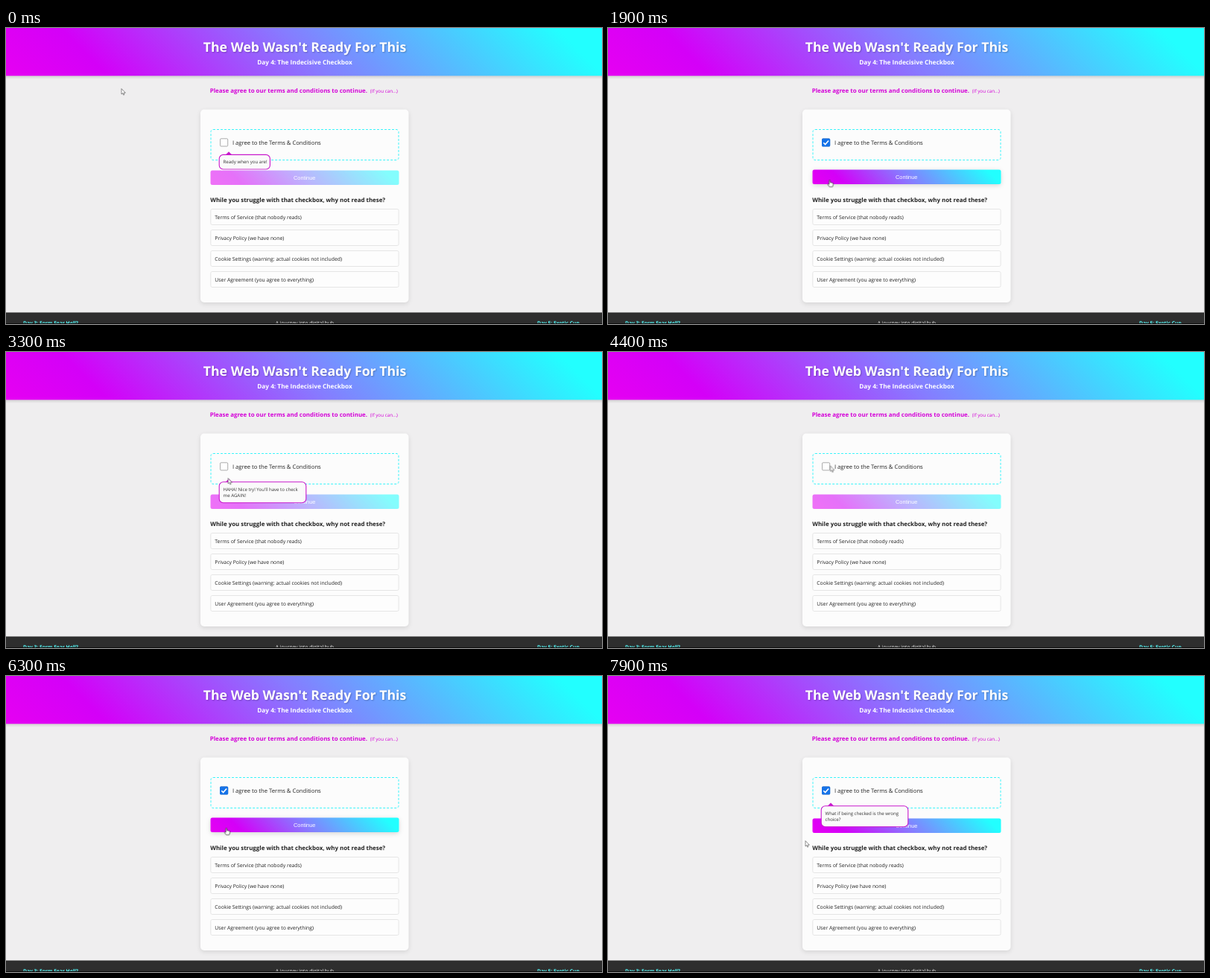
An HTML page that plays this animation: 800 by 398 pixels, repeating every 8000 ms.

```html
<!DOCTYPE html>
<html lang="en">
<head>
<meta charset="utf-8">
<title>The Indecisive Checkbox</title>
<style>
  html, body { margin: 0; width: 100%; height: 100%; overflow: hidden; background: #efeeef; }
  svg { display: block; width: 100vw; height: 100vh; }
  text { font-family: "Open Sans", "Noto Sans", sans-serif; fill: #222; text-rendering: geometricPrecision; }
  .bold { font-weight: 700; }
  .mid { text-anchor: middle; }
  .title { font-size: 17.7px; fill: #fff; text-shadow: 1px 1px 2px rgba(0, 0, 0, .25); }
  .sub { font-size: 8.26px; fill: #fff; }
  .lead { font-size: 7.92px; fill: #d400d8; }
  .aside { font-size: 6.3px; fill: #d400d8; }
  .agree { font-size: 7.65px; }
  .heading { font-size: 7.9px; }
  .links text { font-size: 6.85px; }
  .links rect { fill: #fdfdfd; stroke: #e2e2e2; stroke-width: .9; }
  .button text { font: 7.3px "Liberation Sans", Arial, sans-serif; fill: #fff; }
  .foot text { font-size: 6.7px; }
  .foot .cyan { fill: #5ff; }
  .foot .white { fill: #fff; }
  .bubble text { font-size: 6.1px; fill: #333; }
  .bubble rect { fill: #fafafa; stroke: #c818cc; stroke-width: 1.1; }
  .bubble path { fill: #c818cc; }

  /* everything shares one 8 s clock; states switch hard, moves are eased */
  .state { animation: 8s step-end infinite; }
  .move { animation: 8s ease-in-out infinite; }

  .checked { animation-name: checked; }
  @keyframes checked { 0%, 27.5% { opacity: 0; } 17.5%, 58.5% { opacity: 1; } }

  .face { animation-name: face; }
  @keyframes face { 0%, 27.5% { opacity: .55; } 17.5%, 58.5% { opacity: 1; } }

  .lift { animation-name: lift; }
  @keyframes lift {
    0%, 27.5%, 79% { transform: none; }
    23.5%, 63.5% { transform: translateY(-1px); }
  }

  .glow { animation-name: glow; }
  @keyframes glow { 0%, 36%, 79% { opacity: 0; } 23.5%, 63.5% { opacity: 1; } }

  .ready { animation-name: ready; }
  @keyframes ready { 0% { opacity: 1; } 17.5% { opacity: 0; } }
  .haha { animation-name: haha; }
  @keyframes haha { 0%, 50% { opacity: 0; } 27.5% { opacity: 1; } }
  .doubt { animation-name: doubt; }
  @keyframes doubt { 0% { opacity: 0; } 83.5% { opacity: 1; } }

  .hop { animation-name: hop; }
  @keyframes hop { 0%, 1.25% { transform: translateY(-4.3px); } 5%, 100% { transform: none; } }
  .shake { animation-name: shake; }
  @keyframes shake {
    0%, 83.5%, 91%, 100% { transform: none; }
    85.5%, 89.3% { transform: translateX(2px); }
    87.5%, 88% { transform: translateX(-2px); }
  }

  .cursor { animation-name: travel; }
  @keyframes travel {
    0%, 1.25% { transform: translate(155px, 82px); }
    12.5%, 18.5% { transform: translate(289px, 153px); }
    24%, 34% { transform: translate(297.5px, 204.5px); }
    46%, 55.5% { transform: translate(298.5px, 153.5px); }
    57.5%, 59% { transform: translate(294px, 154px); }
    65%, 78% { transform: translate(298px, 203.5px); }
    84.5% { transform: translate(214px, 235px); animation-timing-function: linear; }
    87.5% { transform: translate(224px, 231px); animation-timing-function: linear; }
    90% { transform: translate(239.5px, 229px); }
    98%, 100% { transform: translate(265px, 222px); }
  }

  .arrow { animation-name: arrow; }
  @keyframes arrow {
    0%, 20%, 36%, 59.5%, 79% { opacity: 1; }
    12%, 23.5%, 56.5%, 63.5% { opacity: 0; }
  }
  .hand { animation-name: hand; }
  @keyframes hand {
    0%, 20%, 27.5%, 59.5%, 79% { opacity: 0; }
    12%, 23.5%, 56.5%, 63.5% { opacity: 1; }
  }
  .denied { animation-name: denied; }
  @keyframes denied { 0%, 36% { opacity: 0; } 27.5% { opacity: 1; } }
</style>
</head>
<body>
<svg viewBox="0 0 800 398" preserveAspectRatio="none">
  <defs>
    <linearGradient id="neon">
      <stop stop-color="#e600f2"/>
      <stop offset=".16" stop-color="#d400f8"/>
      <stop offset=".5" stop-color="#867cff"/>
      <stop offset=".93" stop-color="#22ffff"/>
    </linearGradient>
    <linearGradient id="banner" href="#neon" gradientUnits="userSpaceOnUse" x1="183.75" y1="248.75" x2="616.25" y2="-183.75"/>
    <linearGradient id="action" href="#neon" gradientUnits="userSpaceOnUse" x1="332.9" y1="269.4" x2="469.1" y2="133.1"/>
    <linearGradient id="fade" x2="0" y2="1">
      <stop stop-color="#000" stop-opacity=".13"/>
      <stop offset="1" stop-color="#000" stop-opacity="0"/>
    </linearGradient>
    <filter id="blur" x="-20%" y="-50%" width="140%" height="200%"><feGaussianBlur stdDeviation="3"/></filter>
  </defs>

  <rect width="800" height="398" fill="#efeeef"/>
  <rect y="64" width="800" height="5" fill="url(#fade)"/>
  <rect width="800" height="64.3" fill="url(#banner)"/>
  <text class="title bold mid" x="401" y="31.5">The Web Wasn't Ready For This</text>
  <text class="sub bold mid" x="401" y="48.5">Day 4: The Indecisive Checkbox</text>

  <text class="lead bold" x="273.7" y="87">Please agree to our terms and conditions to continue.</text>
  <text class="aside" x="488.8" y="87">(If you can...)</text>

  <rect x="261" y="111.5" width="279.5" height="259.5" rx="5" opacity=".11" filter="url(#blur)"/>
  <rect x="261" y="109.5" width="279.5" height="259.5" rx="5" fill="#fcfcfc"/>
  <rect x="275" y="136.5" width="252" height="41" rx="3" fill="none" stroke="#3cf4fa" stroke-width="1" stroke-dasharray="3 2"/>

  <rect x="287.5" y="148.8" width="10.2" height="10.2" rx="1.2" fill="#fff" stroke="#888" stroke-width=".7"/>
  <g class="state checked">
    <rect x="287" y="148.4" width="11.2" height="11.2" rx="1.5" fill="#1673e8"/>
    <path d="M289.3 154.2l2.3 2.4 4.5-5.2" fill="none" stroke="#fff" stroke-width="1.6"/>
  </g>
  <text class="agree" x="304" y="157">I agree to the Terms &amp; Conditions</text>

  <g class="button state lift">
    <rect class="state glow" x="275" y="193.5" width="252" height="19" rx="3" fill="rgba(0,0,0,.17)" filter="url(#blur)"/>
    <rect x="274.5" y="191.5" width="253" height="19.5" rx="2.5" fill="#fcfcfc"/>
    <g class="state face">
      <rect x="274.5" y="191.5" width="253" height="19.5" rx="2.5" fill="url(#action)"/>
    </g>
    <text class="mid" x="400.7" y="203.8">Continue</text>
  </g>

  <text class="heading bold" x="274.3" y="233.7">While you struggle with that checkbox, why not read these?</text>
  <g class="links">
    <rect x="274.8" y="243.5" width="252.3" height="21" rx="2"/>
    <text x="280.3" y="256.7">Terms of Service (that nobody reads)</text>
    <rect x="274.8" y="271.5" width="252.3" height="21" rx="2"/>
    <text x="280.3" y="284.7">Privacy Policy (we have none)</text>
    <rect x="274.8" y="299.5" width="252.3" height="21" rx="2"/>
    <text x="280.3" y="312.7">Cookie Settings (warning: actual cookies not included)</text>
    <rect x="274.8" y="327.5" width="252.3" height="21" rx="2"/>
    <text x="280.3" y="340.7">User Agreement (you agree to everything)</text>
  </g>

  <g class="foot">
    <rect y="382.5" width="800" height="15.5" fill="#2e2e2e"/>
    <text class="cyan bold" x="23" y="399.3">Day 3: Form Fear Hell?</text>
    <text class="white mid" x="401" y="399.3">A journey into digital hub</text>
    <text class="cyan bold" x="713" y="399.3">Day 5: Exotic Cup</text>
    <rect y="397" width="800" height="1" fill="#0c0c0c"/>
  </g>

  <g class="bubble state ready"><g class="move hop">
    <path d="M294.5 175l4.5-4.4 4.5 4.4z"/>
    <rect x="286.2" y="174.7" width="68.2" height="19.6" rx="5.5"/>
    <text x="291.5" y="186.7">Ready when you are!</text>
  </g></g>
  <g class="bubble state haha">
    <path d="M294.5 175l4.5-4.4 4.5 4.4z"/>
    <rect x="286.2" y="174.7" width="116.6" height="28" rx="5.5"/>
    <text x="291.5" y="186.7">HAHA! Nice try! You'll have to check</text>
    <text x="291.5" y="195.2">me AGAIN!</text>
  </g>
  <g class="bubble state doubt"><g class="move shake">
    <path d="M294.5 175l4.5-4.4 4.5 4.4z"/>
    <rect x="286.2" y="174.7" width="116.6" height="28" rx="5.5"/>
    <text x="291.5" y="186.7">What if being checked is the wrong</text>
    <text x="291.5" y="195.2">choice?</text>
  </g></g>

  <g class="cursor move" stroke-linejoin="round" stroke-linecap="round">
    <path class="state arrow" d="M0 0v7l1.6-1.4 1.1 2.5 1.2-.5L2.8 5.2H5z" fill="#fff" stroke="#333" stroke-width=".55"/>
    <path class="state hand" d="M-.8 5.4V.6q.8-1.2 1.6 0v3q.8-.7 1.5.1.8-.5 1.4.3.9-.3 1.1.6v2.2L3.8 9.2H-.2L-2.6 6q.4-1.2 1.8-.6z" fill="#fff" stroke="#222" stroke-width=".7"/>
    <g class="state denied" fill="#f2e6a0" stroke="#5c2a22" stroke-width="1.1">
      <circle cy=".5" r="2.8"/>
      <path d="M-2-1.5l4 4"/>
    </g>
  </g>
</svg>
</body>
</html>
```
